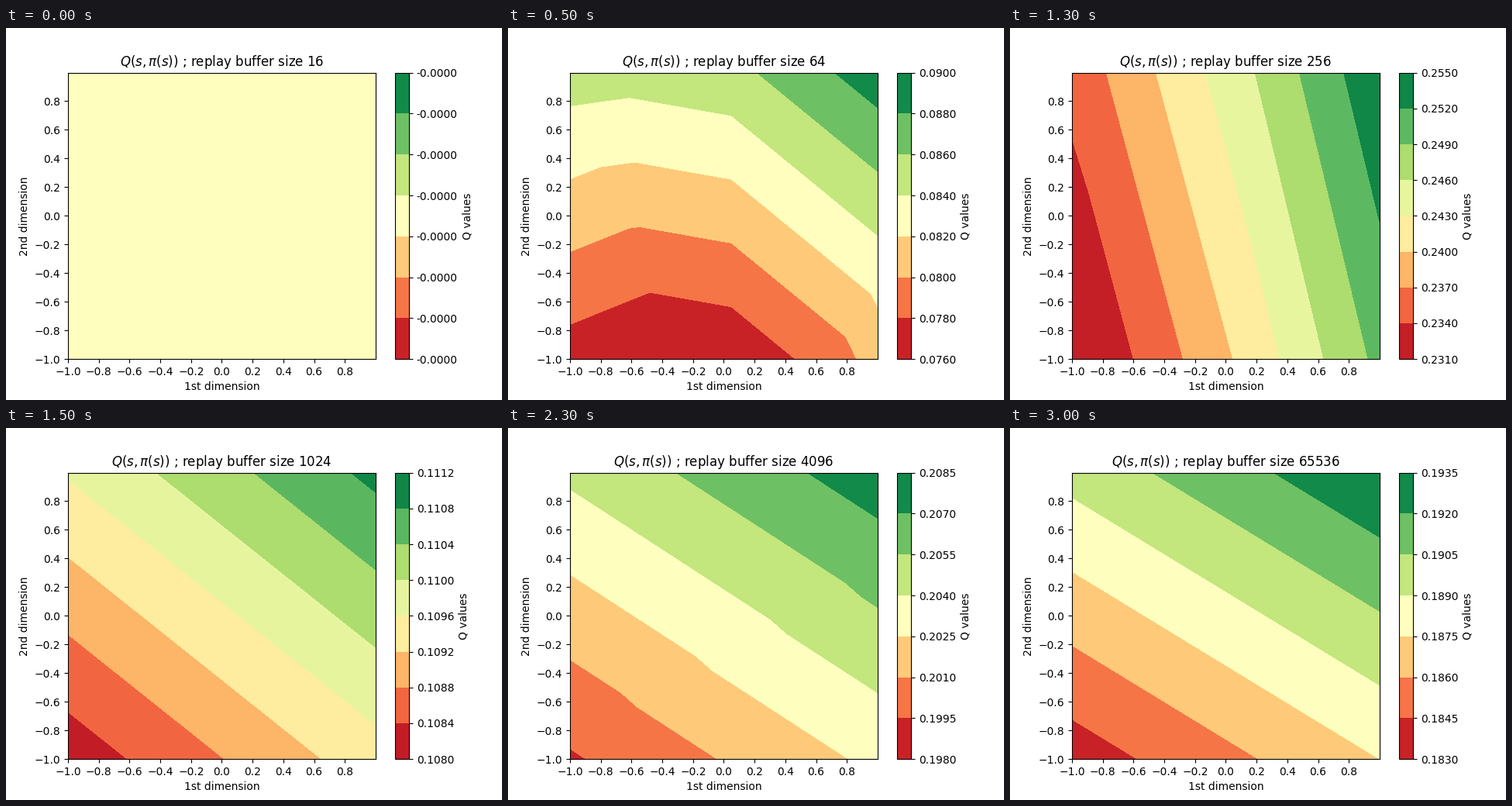
These frames come from a looping animation (640 px wide and 480 px high, 3.5 s). A matplotlib script:

```python
import matplotlib.pyplot as plt
import numpy as np
from matplotlib.animation import FuncAnimation
from matplotlib.ticker import MultipleLocator

axis = np.linspace(-1, .999, 500)
X, Y = np.meshgrid(axis, axis)


def plane(k, x, y, slope, step):
    """Flat field in band units: contour k falls through (x, y), the next lies step higher."""
    return k + (Y - y + slope * (X - x)) / step


def flat():
    return np.full_like(X, 3.5)


def bent():
    left = plane(1, -1, -.757, -.43, .507)
    ridge = plane(4, -.6, .828, -.15, .456)
    middle = plane(1, .05, -.635, .19, .445)
    right = plane(1, .05, -.635, .88, .445)
    corner = plane(2, .775, -.805, 2.2, .665)
    return np.max([left, ridge, middle, right, corner], axis=0)


def steep():
    edge = plane(1, -1, .54, 3.46, 1.3)
    low = plane(1, -.85, 0, 4, 1.292)
    high = plane(5, .4135, 0, 4.474, 1.289)
    return np.max([edge, low, high], axis=0)


def creased():
    step = .595
    crease = np.clip(X - 1.9 * Y - .35, 0, .3)
    return plane(1, -1, -.9, .697, step) + .09 * crease / step


# lowest level, level step, number of bands, field in band units
SCENES = [
    (-8e-6, 1e-6, 7, flat()),
    (.076, .002, 7, bent()),
    (.231, .003, 8, steep()),
    (.108, .0004, 8, plane(1, -1, -.67, .856, .5405)),
    (.198, .0015, 7, creased()),
    (.196, .002, 8, plane(1, -1, -.95, 1.028, .616)),
    (.183, .0015, 7, plane(1, -1, -.722, .655, .516)),
]

fig = plt.figure(figsize=(6.4, 4.8), dpi=100)


def draw(i):
    low, step, bands, field = SCENES[i]
    levels = low + step * np.arange(bands + 1)
    values = low + step * np.clip(field, .01, bands - .01)

    fig.clear()
    ax = fig.add_subplot()
    contours = ax.contourf(X, Y, values, levels=levels, cmap="RdYlGn")
    ax.xaxis.set_major_locator(MultipleLocator(.2))
    ax.yaxis.set_major_locator(MultipleLocator(.2))
    ax.set(xlabel="1st dimension", ylabel="2nd dimension",
           title=rf"$Q(s,\pi(s))$ ; replay buffer size {4 ** (i + 2)}")
    fig.colorbar(contours, ax=ax, ticks=levels, format="%.4f", label="Q values")


anim = FuncAnimation(fig, draw, frames=len(SCENES), interval=500,
                     repeat=True, repeat_delay=0)
plt.show()
```
